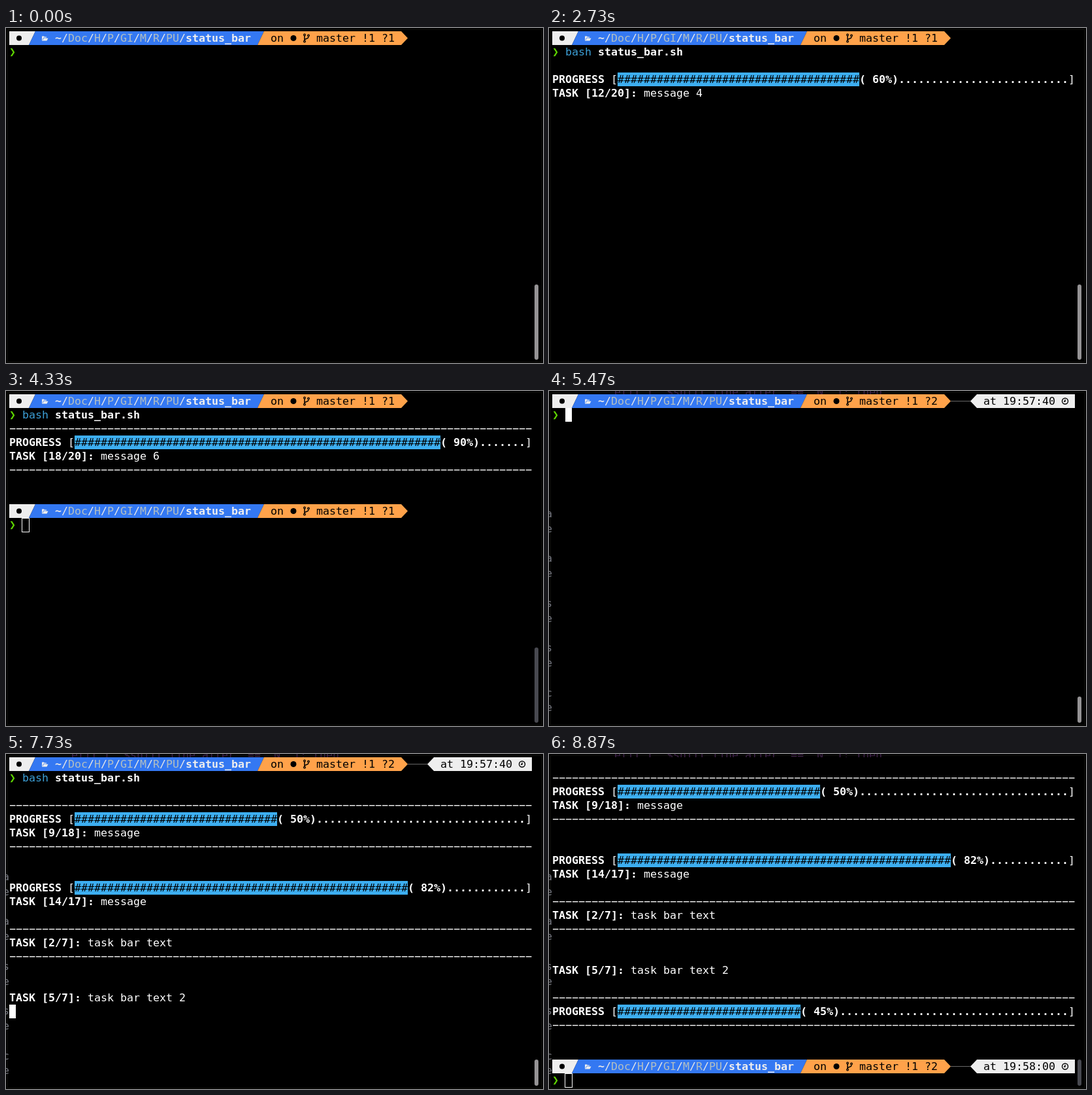
An HTML page with a canvas that plays this animation: 822 by 512 pixels, repeating every 8940 ms.

```html
<!DOCTYPE html>
<html lang="en">
<head>
<meta charset="utf-8">
<title>Terminal status bar</title>
<style>
  html, body { margin: 0; width: 100%; height: 100%; overflow: hidden; background: #000; }
  canvas { display: block; }
</style>
</head>
<body>
<canvas id="stage" width="822" height="512"></canvas>
<script>
const ctx = document.getElementById('stage').getContext('2d');
const LOOP = 8940, SECOND_RUN = 5470;
const CELL = 10, LINE = 21, PAD = 5;
const FONT = '16.61px "DejaVu Sans Mono", monospace';
const WHITE = '#fff', PALE = '#eeeeee', BLUE = '#3478f2', ORANGE = '#ffa24a', BAR = '#3daef0';
const colX = col => PAD + col * CELL;
const rowY = row => PAD + row * LINE;

function text(col, row, string, color = WHITE, bold = false) {
  ctx.font = (bold ? 'bold ' : '') + FONT;
  ctx.fillStyle = color;
  ctx.fillText(string, colX(col), rowY(row) + 16);
}

function polygon(color, ...points) {
  ctx.fillStyle = color;
  ctx.beginPath();
  points.forEach(([x, y]) => ctx.lineTo(x, y));
  ctx.fill();
}

function circle(x, y, radius, color) {
  ctx.fillStyle = color;
  ctx.beginPath();
  ctx.arc(x, y, radius, 0, Math.PI * 2);
  ctx.fill();
}

function strokePath(path, x, y, color, width) {
  ctx.save();
  ctx.translate(x, y);
  ctx.strokeStyle = color;
  ctx.lineWidth = width;
  ctx.stroke(new Path2D(path));
  ctx.restore();
}

function folderIcon(x, y) {
  polygon(PALE, [x, y - 3], [x + 3, y - 3], [x + 4, y - 2], [x + 7, y - 2], [x + 7, y],
    [x + 9.5, y], [x + 7.5, y + 4], [x, y + 4]);
  strokePath('M1 3 L2.5 -.5 H8', x, y, BLUE, 0.8);
}

function branchIcon(x, y) {
  strokePath('M2 -4 V4 M2 3 C2 0 8 2 8 -2', x, y, '#000', 1.5);
  for (const [dx, dy] of [[2, -5], [2, 5], [8, -4]]) {
    circle(x + dx, y + dy, 2, '#000');
    circle(x + dx, y + dy, 0.7, ORANGE);
  }
}

function prompt(row, changes, clock) {
  const top = rowY(row), bottom = top + LINE, middle = top + LINE / 2;
  polygon(PALE, [5, top], [45, top], [35, bottom], [5, bottom]);
  polygon(BLUE, [45, top], [395, top], [385, bottom], [35, bottom]);
  polygon(ORANGE, [395, top], [605, top], [615, middle], [605, bottom], [385, bottom]);
  circle(20, middle, 4, '#000');
  folderIcon(55, middle);

  let col = 7;
  for (const part of '~/Doc/H/P/GI/M/R/PU/'.split(/(\/)/)) {
    const separator = part === '/' || part === '~';
    text(col, row, part, separator ? '#e8e8e8' : '#b2bfc2', part === '~');
    col += part.length;
  }
  text(col, row, 'status_bar', PALE, true);
  text(40, row, 'on', '#000');
  circle(440, middle, 4.5, '#000');
  branchIcon(455, middle);
  text(47, row, 'master !1 ?' + changes, '#000');

  if (clock) {
    ctx.fillStyle = '#686868';
    ctx.fillRect(615, top + 10, 31, 1);
    polygon(PALE, [645, middle], [655, top], [805, top], [805, bottom], [655, bottom]);
    text(66, row, 'at ' + clock, '#000');
    strokePath('M4.5 0 A4.5 4.5 0 1 1 -4.5 0 A4.5 4.5 0 1 1 4.5 0 M0 -2.5 V.5 H-2', 790, middle, '#000', 1.4);
  }
}

const chevron = row => text(0, row, '❯', '#5fd700', true);

function command(row) {
  text(2, row, 'bash', '#3c9fd6');
  text(7, row, 'status_bar.sh', WHITE, true);
}

function cursor(col, row, focused = true) {
  ctx.fillStyle = ctx.strokeStyle = WHITE;
  ctx.lineWidth = 1;
  if (focused) ctx.fillRect(colX(col), rowY(row), CELL, LINE);
  else ctx.strokeRect(colX(col) - 0.5, rowY(row) + 0.5, CELL + 1, LINE);
}

const rule = row => text(0, row, '−'.repeat(80));

function progress(row, done, total) {
  const percent = Math.floor(done / total * 100);
  const filled = Math.floor(63 * percent / 100);
  text(0, row, 'PROGRESS', WHITE, true);
  text(9, row, '[');
  ctx.fillStyle = BAR;
  ctx.fillRect(colX(10), rowY(row), filled * CELL, LINE);
  text(10, row, '#'.repeat(filled), '#000');
  text(10 + filled, row, `( ${percent}%)`.replace('( ', percent < 10 ? '(  ' : '( ') + '.'.repeat(63 - filled), WHITE, true);
  text(79, row, ']');
}

function task(row, done, total, message) {
  const label = `TASK [${done}/${total}]:`;
  text(0, row, label, WHITE, true);
  text(label.length + 1, row, message);
}

// Fades from focused to unfocused, level 0..1.
function scrollbar(top, level) {
  const mix = (from, to) => Math.round(from + (to - from) * Math.min(1, Math.max(0, level)));
  ctx.fillStyle = `rgb(${mix(149, 72)},${mix(147, 73)},${mix(149, 80)})`;
  ctx.beginPath();
  ctx.roundRect(809, top, 6, 507 - top, 3);
  ctx.fill();
}

// Slivers of the editor window that show past the terminal's edge.
function editorBehind() {
  ctx.save();
  ctx.beginPath();
  ctx.rect(0, 0, 4, 512);
  ctx.rect(0, 0, 822, 5);
  ctx.clip();
  ctx.font = FONT;
  ctx.fillStyle = '#3c2046';
  ctx.fillText('elif [ "$shift_line_after" == "N" ]; then', 100, 7);
  ctx.fillStyle = '#74767f';
  [...'ae ae se se ce'].forEach((letter, i) => ctx.fillText(letter, -5, 193 + 22.8 * i));
  ctx.restore();
}

const UPDATES = [[870, 3], [1400, 6], [1930, 12], [2400, 12], [2930, 15], [3470, 18]];

function firstRun(t) {
  prompt(0, 1);
  chevron(1);
  if (t >= 70) command(1);
  if (t >= 70 && t < 670) cursor(20, 1);

  const count = UPDATES.filter(([start]) => t >= start).length;
  if (count) {
    const done = UPDATES[count - 1][1];
    progress(3, done, 20);
    task(4, done, 20, 'message ' + count);
  }
  if (t >= 3470) { rule(2); rule(5); }
  if (t >= 4070) {
    prompt(8, 1);
    chevron(9);
    cursor(2, 9, false);
  }
  scrollbar(392, (t - 4010) / 320);
}

function secondRun(t) {
  const finished = t >= 8800, focused = t < 7930;
  const shift = finished ? -2 : 0;
  editorBehind();
  if (!finished) {
    prompt(0, 2, '19:57:40');
    chevron(1);
    if (t < 5530) cursor(2, 1);
    else command(1);
    if (t >= 5530 && t < 5670) cursor(20, 1);
  }
  if (t >= 6200) {
    rule(3 + shift);
    progress(4 + shift, 9, 18);
    task(5 + shift, 9, 18, 'message');
    rule(6 + shift);
    if (t < 6730) cursor(0, 8);
  }
  if (t >= 6730) {
    progress(9 + shift, 14, 17);
    task(10 + shift, 14, 17, 'message');
  }
  if (t >= 7200) {
    rule(12 + shift);
    task(13 + shift, 2, 7, 'task bar text');
    rule(14 + shift);
    if (t < 7730) cursor(0, 16);
  }
  if (t >= 7730) {
    task(17 + shift, 5, 7, 'task bar text 2');
    if (t < 8270) cursor(0, 18, focused);
  }
  if (t >= 8270) {
    rule(19 + shift);
    progress(20 + shift, 45, 100);
    rule(21 + shift);
    if (!finished) cursor(0, 23, false);
  }
  if (finished) {
    prompt(22, 2, '19:58:00');
    chevron(23);
    cursor(2, 23, false);
  }
  scrollbar(467, (t - 7930) / 340);
}

function draw(t) {
  ctx.fillStyle = '#000';
  ctx.fillRect(0, 0, 822, 512);
  ctx.strokeStyle = '#10100c';
  ctx.lineWidth = 1;
  ctx.strokeRect(2.5, 2.5, 817, 508);
  if (t < SECOND_RUN) firstRun(t);
  else secondRun(t);
}

const start = performance.now();
function tick() {
  draw((performance.now() - start) % LOOP);
  requestAnimationFrame(tick);
}
tick();
</script>
</body>
</html>
```
